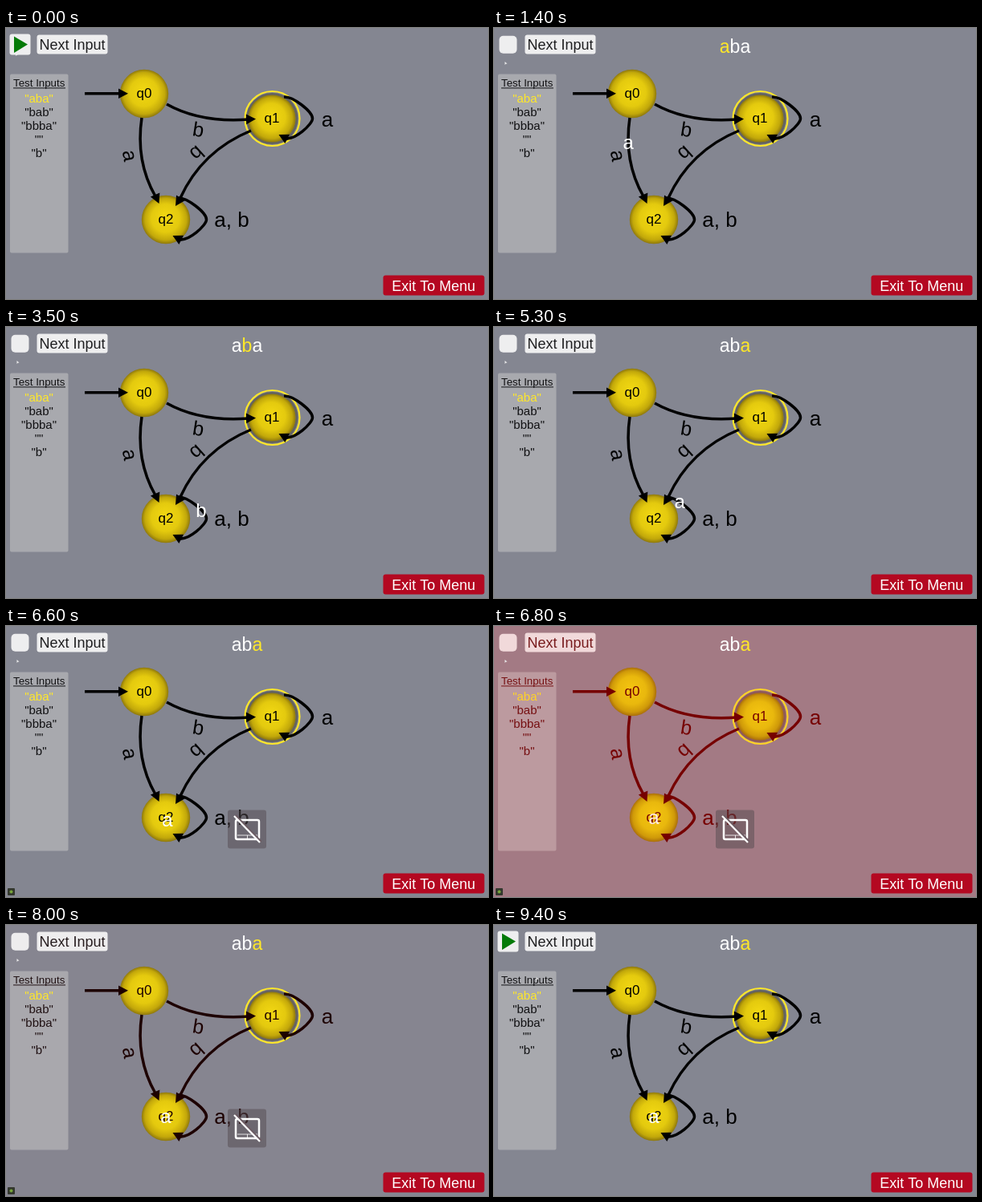
Write an HTML page with a canvas that moves like this. It is 600 by 338 pixels and loops after 9.5 s.

```html
<!DOCTYPE html>
<html lang="en">
<head>
<meta charset="utf-8">
<title>Automaton run</title>
<style>
html, body { margin: 0; width: 100%; height: 100%; overflow: hidden; background: #848691; }
canvas { display: block; width: 600px; height: 338px; }
</style>
</head>
<body>
<canvas id="stage" width="600" height="338"></canvas>
<script>
const ctx = document.getElementById('stage').getContext('2d');
const LOOP = 9500, START = 650, STEP = 2000;
const FLASH = 6690, FLASH_LEN = 1400, RESET = 8100;
const FONT = '"Liberation Sans", Arial, sans-serif';
const WHITE = [255, 255, 255], BLACK = [0, 0, 0], YELLOW = [255, 232, 40];
const states = [['q0', 172, 82, 30.2], ['q1', 331, 113, 29.6], ['q2', 199, 239, 30.2]];
const word = 'aba';
let glow = 0;

const clamp = v => Math.max(0, Math.min(1, v));
const toLinear = c => Math.pow(c / 255, 2.2);
const toByte = c => Math.round(255 * Math.pow(c, 1 / 2.2));

// Blends a colour with the red failure flash in linear light.
function tint(c) {
  if (!glow) return `rgb(${c})`;
  return `rgb(${c.map((v, i) => toByte(toLinear(v) * (1 - glow) + (i ? 0 : glow)))})`;
}

function box(x, y, w, h, r, fill) {
  ctx.beginPath();
  ctx.roundRect(x, y, w, h, r);
  ctx.fillStyle = fill;
  ctx.fill();
}

function label(str, x, y, size, fill, angle = 0) {
  ctx.save();
  ctx.translate(x, y);
  ctx.rotate(angle * Math.PI / 180);
  ctx.font = `${size}px ${FONT}`;
  ctx.textAlign = 'center';
  ctx.fillStyle = fill;
  ctx.fillText(str, 0, 0);
  ctx.restore();
}

function poly(points, fill) {
  ctx.beginPath();
  points.forEach(p => ctx.lineTo(p[0], p[1]));
  ctx.closePath();
  ctx.fillStyle = fill;
  ctx.fill();
}

function head(x, y, angle) {
  ctx.save();
  ctx.translate(x, y);
  ctx.rotate(angle * Math.PI / 180);
  poly([[0, 0], [-12, -6.3], [-12, 6.3]], tint(BLACK));
  ctx.restore();
}

// Cubic edges: start, two handles, end.
const quad = (x0, y0, cx, cy, x1, y1) => [
  x0, y0, x0 + (cx - x0) * 2 / 3, y0 + (cy - y0) * 2 / 3,
  x1 + (cx - x1) * 2 / 3, y1 + (cy - y1) * 2 / 3, x1, y1];
const loopAt = (x, y) => [
  [x + 15, y - 27, x + 26, y - 28, x + 50.5, y - 9, x + 50.5, y],
  [x + 50.5, y, x + 50.5, y + 7, x + 28, y + 28, x + 16, y + 24.5]];
const edge02 = quad(169, 112, 161, 166, 186, 210);
const loop1 = loopAt(331, 113), loop2 = loopAt(199, 239);
const edges = [
  quad(98, 81.7, 120, 81.7, 143, 81.7),
  quad(200, 95, 242, 118.5, 302, 114),
  edge02,
  quad(305, 128, 244, 153, 217, 212),
  ...loop1, ...loop2
];

function sample(curves, from, to) {
  const pts = [from];
  for (const [a, b, c, d, e, f, g, h] of curves) {
    for (let i = 0; i <= 20; i++) {
      const t = i / 20, u = 1 - t;
      const k = [u * u * u, 3 * u * u * t, 3 * u * t * t, t * t * t];
      pts.push([k[0] * a + k[1] * c + k[2] * e + k[3] * g,
                k[0] * b + k[1] * d + k[2] * f + k[3] * h]);
    }
  }
  pts.push(to);
  return pts;
}

const home = [199, 239];
const loopRoute = sample(loop2, home, home);
const routes = [sample([edge02], [172, 82], home), loopRoute, loopRoute];

function along(pts, p) {
  const len = i => Math.hypot(pts[i][0] - pts[i - 1][0], pts[i][1] - pts[i - 1][1]);
  let total = 0;
  for (let i = 1; i < pts.length; i++) total += len(i);
  let rest = total * p;
  for (let i = 1; i < pts.length; i++) {
    const l = len(i);
    if (l && rest <= l) {
      const k = rest / l, a = pts[i - 1], b = pts[i];
      return [a[0] + (b[0] - a[0]) * k, a[1] + (b[1] - a[1]) * k];
    }
    rest -= l;
  }
  return pts[pts.length - 1];
}

function ring(x, y, r, width, color) {
  ctx.beginPath();
  ctx.arc(x, y, r, 0, 7);
  ctx.lineWidth = width;
  ctx.strokeStyle = color;
  ctx.stroke();
}

function drawStates() {
  ring(331.5, 113, 34, 2.2, tint(YELLOW));
  ring(331.3, 113, 30.6, 3, tint([100, 99, 96]));
  for (const [, x, y, r] of states) {
    const g = ctx.createRadialGradient(x - 1, y - 4, 2, x, y, r);
    g.addColorStop(0, tint([240, 214, 18]));
    g.addColorStop(0.55, tint([228, 202, 14]));
    g.addColorStop(0.85, tint([194, 168, 10]));
    g.addColorStop(1, tint([142, 120, 12]));
    ctx.beginPath();
    ctx.arc(x, y, r, 0, 7);
    ctx.fillStyle = g;
    ctx.fill();
  }
}

function drawEdges() {
  const ink = tint(BLACK);
  ctx.lineWidth = 3.5;
  ctx.strokeStyle = ink;
  for (const [a, b, c, d, e, f, g, h] of edges) {
    ctx.beginPath();
    ctx.moveTo(a, b);
    ctx.bezierCurveTo(c, d, e, f, g, h);
    ctx.stroke();
  }
  head(152, 81.7, 0);
  head(311, 113.5, -2);
  head(190.5, 219, 66);
  head(211, 222, 122);
  head(339.5, 133, 207);
  head(207.5, 259, 207);
  label('b', 238, 135, 25, ink, 9);
  label('a', 146, 160.5, 25, ink, 80);
  label('b', 232, 150, 25, ink, 138);
  label('a', 400, 122.5, 26, ink);
  label('a, b', 281, 248, 26, ink);
  for (const [name, x, y] of states) label(name, x, y + 5, 17, ink);
}

function drawPanel() {
  const ink = tint([18, 18, 20]);
  box(5, 57.5, 72.5, 223, 2, tint([168, 169, 174]));
  label('Test Inputs', 41.2, 73, 13.3, ink);
  ctx.fillStyle = ink;
  ctx.fillRect(9, 74.4, 65, 1);
  ['"aba"', '"bab"', '"bbba"', '""', '"b"'].forEach((s, i) =>
    label(s, 41, 92.5 + i * 17.2, 15, i ? ink : tint(YELLOW)));
}

function drawButtons(idle) {
  const face = tint([238, 238, 239]);
  if (idle) {
    box(4.5, 7.5, 26, 26, 3, face);
    poly([[10, 10.5], [27, 20.5], [10, 31]], tint([4, 122, 8]));
  } else {
    box(6.5, 9.7, 22, 22, 5, face);
  }
  box(38.5, 8.5, 88, 24, 3, face);
  label('Next Input', 82.5, 27, 18, tint([30, 30, 32]));
  box(469.5, 308.5, 126, 25, 3, 'rgb(180,8,33)');
  label('Exit To Menu', 532.3, 327.5, 18, '#fff');
}

function drawTitle(active) {
  ctx.font = `23px ${FONT}`;
  const w = ctx.measureText('a').width;
  [...word].forEach((c, i) =>
    label(c, 300 + (i - 1) * w, 31, 23, i === active ? `rgb(${YELLOW})` : '#fff'));
}

function drawPointer(t) {
  const a = clamp((t - 700) / 300), b = clamp((t - 8700) / 700);
  const x = 12 + 1.5 * a + 39 * b, y = 31 + 11 * a + 23 * b;
  poly([[x, y], [x + 3, y + 2.5], [x + 1.2, y + 2.7], [x, y + 4]], '#eee');
}

function drawNotice() {
  box(276, 229.5, 48, 48, 3, 'rgba(85,75,80,.5)');
  ctx.strokeStyle = '#fff';
  ctx.lineWidth = 2.5;
  ctx.beginPath();
  ctx.roundRect(286, 242, 29, 24, 2);
  ctx.stroke();
  ctx.lineWidth = 0.8;
  ctx.beginPath();
  ctx.moveTo(288, 261);
  ctx.lineTo(313, 261);
  ctx.moveTo(300.5, 261);
  ctx.lineTo(300.5, 265);
  ctx.stroke();
  [[1.8, '#6d5c63'], [0, '#fff']].forEach(([shift, color]) => {
    ctx.lineWidth = 2.2;
    ctx.strokeStyle = color;
    ctx.beginPath();
    ctx.moveTo(284 + shift, 237 - shift / 2);
    ctx.lineTo(316 + shift, 270 - shift / 2);
    ctx.stroke();
  });
  box(2, 327, 9, 9, 1, '#34382e');
  box(4.5, 329.5, 4, 4, 2, '#76a33a');
}

function draw(t) {
  glow = t < FLASH ? 0 : 0.2 * Math.pow(1 - clamp((t - FLASH) / FLASH_LEN), 1.15);
  ctx.fillStyle = tint([132, 134, 145]);
  ctx.fillRect(0, 0, 600, 338);
  drawStates();
  drawEdges();
  drawPanel();
  drawButtons(t < START || t >= RESET);
  if (t >= START) {
    const i = Math.min(2, Math.floor((t - START) / STEP));
    const [x, y] = along(routes[i], clamp((t - START - i * STEP) / STEP));
    label(word[i], x, y + (word[i] === 'b' ? 8.5 : 7.5), 24, tint(WHITE));
    drawTitle(i);
  }
  if (t >= 6400 && t < 8900) drawNotice();
  drawPointer(t);
}

const begin = performance.now();
function tick() {
  draw((performance.now() - begin) % LOOP);
  requestAnimationFrame(tick);
}
tick();
</script>
</body>
</html>
```
